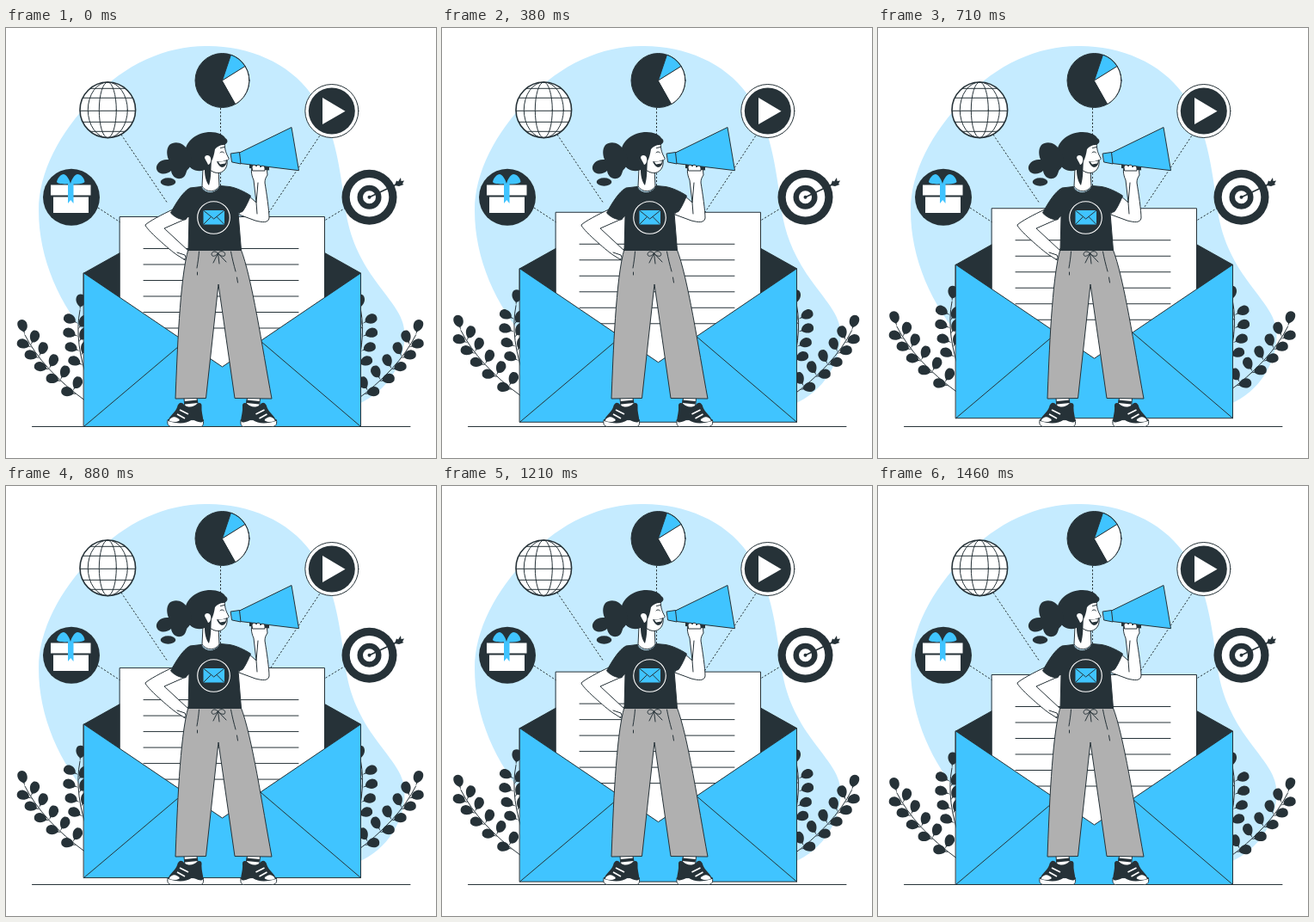
Animation, 500 px wide and 500 px high, one loop 1500 ms. Source, as an HTML page:

```html
<!DOCTYPE html>
<html lang="en">
<head>
<meta charset="utf-8">
<title>Email campaign</title>
<style>
  html, body { margin: 0; width: 100%; height: 100%; overflow: hidden; background: #fff; }
  svg { display: block; width: 100%; height: 100%; }
  .ink { fill: #263238; }
  .blue { fill: #40c4ff; }
  .white { fill: #fff; }
  .gray { fill: #b0b0b0; }
  .line { stroke: #263238; stroke-width: 1; stroke-linecap: round; stroke-linejoin: round; }
  .open { fill: none; }
  .bold { stroke-width: 1.6; }
  .dash { stroke-dasharray: 2.2 2; stroke-linecap: butt; }
</style>
</head>
<body>
<svg viewBox="0 0 500 500" xmlns="http://www.w3.org/2000/svg">
  <defs>
    <path id="leaf" class="ink" d="M0 0L4 -.6C7 -5 13 -7 17 -4C20 0 18 4 14 5.500C9 6.500 5 4 4 .6Z"/>
    <g id="plant"></g>
    <g id="shoe">
      <path class="white line" d="M207 430.500L208 442H224L222 430.500Z"/>
      <path class="ink" d="M207.500 434L223 432.500V436L208 437.500Z"/>
      <path class="white line" d="M188 456C187 461 189 463.500 193 463.500H226C229 463.500 230 461 229.500 456Z"/>
      <path class="ink" d="M188.500 456C191 450 197 447 199 441C200 436 204 434 207 438C212 442 218 441 222 437C225 435 228 436 227.500 440C227 446 229 451 229.500 457C226 461 221 456 216 455.500C209 461 198 460 188.500 457Z"/>
      <path d="M202 444L212 449M199 449L208 454" fill="none" stroke="#fff" stroke-width="1.700"/>
      <path class="white" d="M190 456C193 451 198 451 202 456C199 459 194 458 190 457Z"/>
    </g>
  </defs>

  <path fill="#c5ebff" d="M232 21C279 20 328 39 355 77C380 111 386 150 392 190C396 228 402 252 424 286C446 318 463 332 463.500 356C464 386 446 422 408 438L100 365C62 322 38 268 38 212C38 168 62 122 101 82C138 42 186 21 232 21Z"/>

  <path class="line open dash" d="M134 124L188 204M249.500 93V190M367 122L304 217M107 209L136 228M395 209L367 226"/>

  <g id="globe" class="line open"></g>

  <g>
    <circle class="ink line" cx="251.500" cy="61" r="31.500"/>
    <path class="blue line" d="M251.500 61L261.500 31.200A31.500 31.500 0 0 1 278 44.500Z"/>
    <path class="white line" d="M251.500 61L278 44.500A31.500 31.500 0 0 1 267 88.500Z"/>
  </g>

  <g>
    <circle class="white line" cx="378.800" cy="96.500" r="31"/>
    <circle class="ink" cx="378.800" cy="96.500" r="27"/>
    <path class="white" d="M368 81L394.500 96.700L368 112Z"/>
  </g>

  <g>
    <circle class="ink" cx="76" cy="196.800" r="33"/>
    <path class="white" d="M52 182.500H98.500V194.500H52ZM55 196.500H96V215H55Z"/>
    <path class="blue" d="M75 181C66 182 60 181 59 179C60 174 64 170 67 170C71 171 74 177 75 181C76 177 79 171 83 170C87 170 91 174 91.500 179C90 181 84 182 75 181ZM72 181H78.500V204L75.200 200L72 204Z"/>
  </g>

  <g>
    <circle class="ink" cx="422.500" cy="196.800" r="32"/>
    <circle class="white" cx="422.500" cy="196.800" r="22.800"/>
    <circle class="ink" cx="422.500" cy="196.800" r="14"/>
    <circle class="white" cx="422.500" cy="196.800" r="7.500"/>
    <circle class="ink" cx="422.500" cy="196.800" r="2"/>
    <path class="line bold" d="M422.500 196.800L460 179"/>
    <path class="ink" d="M452 183L454 177.500L456 178.500L459 174L459.500 178L463 177.500L461 181L462.500 182L457 184Z"/>
  </g>

  <g id="mail">
    <use href="#plant"/>
    <use href="#plant" transform="translate(498.500) scale(-1 1)"/>
    <path class="ink line" d="M90.500 285L132.500 261.500H370.500L412.500 285V320H90.500Z"/>
    <rect class="white line" x="132.500" y="219.500" width="238" height="190"/>
    <g id="rows" class="line"></g>
    <path class="blue line" d="M90.500 285L251.500 394L412.500 285V463.500H90.500Z"/>
    <path class="line open" d="M90.500 463.500L207 365M412.500 463.500L296 364"/>
  </g>

  <path class="line" d="M30.500 463.500H470"/>

  <g id="woman">
    <use href="#shoe"/>
    <use href="#shoe" transform="translate(502.500) scale(-1 1)"/>

    <path class="white line" d="M194 211C181 217 166 225 162 229C162 233 190 258 199 264L207 269L212 272V259L184 233L209 222Z"/>
    <path class="line open" d="M199 261L208 264L210 269M207 269L212 266"/>

    <path class="gray line" d="M212 257H273C286 290 298 372 309 431L266 430.500L247 298L232.500 430.500L197 431C199 380 202 291 212 257Z"/>
    <path class="line open" d="M224.500 260C224 267 223 273 222 279M222.500 284V287M261.500 260C263 268 265 276 267 283M268.500 290L269.500 296"/>
    <path class="line open" d="M246.500 262C242 257 237 262 240 265C242 266 245 264 246.500 262C250 257 257 261 254 265C251 266 248 264 246.500 262L241 273M246.500 262L248 274M246.500 262L256 272"/>

    <path class="white line" d="M281 194L291 203L288 177C285 170 284 163 288 160H303L304 171C302 174 301 176 301 180C303 192 306 212 306 221C305 227 298 226 290 224L271 217Z"/>
    <path class="line open" d="M293 180L291 203L292 216"/>

    <path class="white line" d="M229 164L228 184C233 192 244 191 248 184L247 164Z"/>
    <path class="ink line" d="M227 184.500L214 186C206 190 198 203 191.500 215C196 220 203 223 208.500 223L213 218L212 258.500H273.500L270 215L275 213.500C279 208 282 201 284.500 195C277 190 268 186 260 184.500L249 183.500C244 194 231 194 227 184.500Z"/>
    <circle cx="241.500" cy="220.500" r="18.800" fill="none" stroke="#fff" stroke-width="1.100"/>
    <rect class="blue" x="229.500" y="212" width="24.500" height="16.500"/>
    <path class="line open" d="M229.500 212L241.700 222L254 212M229.500 228.500L238.500 219.500M254 228.500L245 219.500"/>

    <path class="white line" d="M239 135L254.500 134C254 141 256 146 259 151.500C259 153 258 153.500 257 154C258 160 255 167 248 168.500C241 169 235 165 233 158Z"/>
    <path class="ink" d="M245 155C249 156 253 155 257 153C257 159 254 162 251 162C248 161 246 158 245 155Z"/>
    <path class="white" d="M247 156L256 154.500L255 157.500L249 158.500Z"/>
    <path class="line open" d="M249 145C250 143.500 252 143.500 253.500 145M249.500 139.500L254 138.500"/>
    <path class="ink" d="M208 145C209 131 222 121 238 121C246 121 253 124 255 128C259 130 258 135 253 136C249 136 245 138 243 141C242 147 241 151 239 155C238 165 239 173 236 183C233 179 231 173 231 165C218 170 207 159 208 145Z"/>
    <path class="white" d="M231 151C231 147 237 147 238 151C239 155 237 159 235 159C234 156 232 154 231 151Z"/>
    <path class="ink" d="M211 142C207 133 196 131 190 136C186 141 187 148 189 153C180 152 174 158 175 164C177 171 187 171 192 166C193 174 201 178 207 173C210 170 209 166 212 164C218 158 217 147 211 142Z"/>
    <ellipse class="ink" cx="188.500" cy="179" rx="8.800" ry="4.700"/>

    <path class="ink" d="M283 157L306 160.500L306 165.500L283 163Z"/>
    <path class="blue line" d="M271.500 145L332 115.500L340.500 165.700L272.500 157.500Z"/>
    <path class="blue line" d="M261.500 146L271.500 144.500L273 158L263 156Z"/>
    <path class="white line" d="M286 162C286 159 290 158 291 161C292 158 296 159 296 162C297 159 301 160 301 163L301 166H287Z"/>
  </g>
</svg>
<script>
const $ = id => document.getElementById(id);
const line = (x1, y1, x2, y2) => `<path d="M${x1} ${y1}L${x2} ${y2}"/>`;

// One curved stem with leaves given as [position along stem, angle].
function branch([x0, y0, x1, y1, x2, y2], leaves) {
  const bend = (a, b, c, t) => (1 - t) ** 2 * a + 2 * t * (1 - t) * b + t * t * c;
  const stem = `<path class="line open" d="M${x0} ${y0}Q${x1} ${y1} ${x2} ${y2}"/>`;
  return stem + leaves.map(([t, a]) =>
    `<use href="#leaf" transform="translate(${bend(x0, x1, x2, t)} ${bend(y0, y1, y2, t)}) rotate(${a})"/>`
  ).join("");
}

function globe(cx, cy, r) {
  let s = `<circle class="white bold" cx="${cx}" cy="${cy}" r="${r}"/>`;
  for (const rx of [10, 23]) s += `<ellipse cx="${cx}" cy="${cy}" rx="${rx}" ry="${r}"/>`;
  for (const dy of [-25, -14, 1, 14, 25]) {
    const half = Math.sqrt(r * r - dy * dy);
    s += line(cx - half, cy + dy, cx + half, cy + dy);
  }
  return s;
}

$("globe").innerHTML = globe(118.3, 95.3, 32.3);
$("plant").innerHTML =
  branch([93, 434, 42.5, 397.5, 22, 357], [
    [1, -105], [.85, -68], [.68, -66], [.5, -64], [.33, -62], [.16, -62],
    [.82, 201], [.66, 199], [.49, 197], [.31, 196], [.11, 195]
  ]) +
  branch([97, 415, 78.5, 366, 86, 328], [
    [1, -86], [.8, 207], [.62, 200], [.42, 203], [.24, 205],
    [.72, -55], [.54, -58], [.36, -62]
  ]);
$("rows").innerHTML = Array.from({ length: 6 }, (_, i) => {
  const y = 256.5 + i * 18.5;
  return line(160, y, 340, y);
}).join("");

// The letter rises and sinks at a steady pace, then rests briefly.
const LOOP = 1500, FLOAT = 1458, RISE = 10;

function draw(ms) {
  const p = Math.min(1, (ms % LOOP) / FLOAT);
  const lift = RISE * (1 - Math.abs(1 - 2 * p));
  $("mail").setAttribute("transform", `translate(0 ${-lift})`);
}

function tick() {
  draw(performance.now());
  requestAnimationFrame(tick);
}
tick();
</script>
</body>
</html>
```
